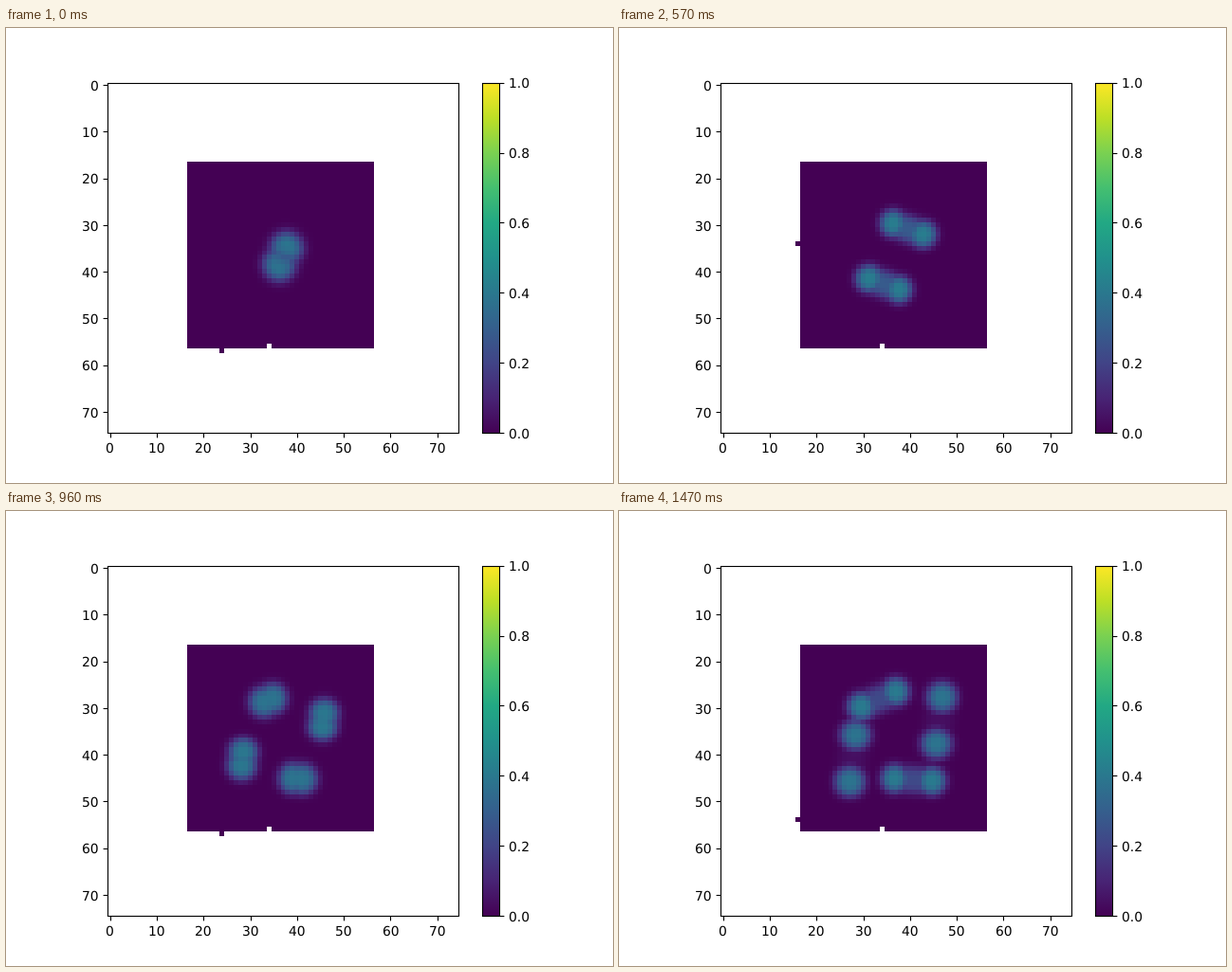
Animation of 640 by 480 pixels, one loop 1500 ms. Source, as an HTML page with a canvas:

```html
<!DOCTYPE html>
<html lang="en">
<head>
<meta charset="utf-8">
<title>Dividing spots</title>
<style>
html, body { margin: 0; width: 640px; height: 480px; overflow: hidden; background: #fff; }
canvas { display: block; }
</style>
</head>
<body>
<canvas id="stage" width="640" height="480"></canvas>
<script>
const ctx = document.getElementById('stage').getContext('2d');
const LEFT = 107.2, TOP = 57.6, SIZE = 369.6, CELL = SIZE / 75;
const FIRST = 17, SIDE = 40, STEPS = 50, STEP_MS = 30;

const viridis = ['440154', '482475', '414487', '355f8d', '2a788e', '21918c',
  '22a884', '44bf70', '7ad151', 'bddf26', 'fde725'];
const stops = viridis.map(hex => [0, 2, 4].map(i => parseInt(hex.slice(i, i + 2), 16)));

function colour(v) {
  const x = Math.max(0, Math.min(1, v)) * 10, i = Math.min(9, Math.floor(x));
  return `rgb(${stops[i].map((c, k) => Math.round(c + (stops[i + 1][k] - c) * (x - i)))})`;
}

// Each generation: start step and, per cell, the axis (radians) and pace of its division.
const generations = [
  { start: -4.5, axes: [-1.16], paces: [1] },
  { start: 11, axes: [.34], paces: [1] },
  { start: 26, axes: [-.4, 1.69, 1.69, .06], paces: [.42, .57, .57, .42] },
];

// Distance of a daughter from the point of division.
const spread = age => 6.9 * (1 - Math.exp(-((Math.max(0, age) / 10.8) ** 1.3)));

// Returns the spots and the bridges that still join sisters.
function colonyAt(n) {
  let cells = [{ x: 37, y: 36.8, pinch: 0 }];
  const bridges = [];
  for (const { start, axes, paces } of generations) {
    cells = cells.flatMap((cell, i) => {
      const axis = axes[i % axes.length];
      const s = spread((n - start) * paces[i % paces.length]);
      const pinch = Math.max(cell.pinch, Math.sin(Math.PI * Math.min(1, s / 6)));
      const dx = s * Math.cos(axis), dy = s * Math.sin(axis);
      const strength = (1 - .09 * s) / (1 + (s / 4.5) ** 14);
      bridges.push({ x: cell.x, y: cell.y, dx, dy, s, pinch, strength });
      return [-1, 1].map(side => ({ x: cell.x + side * dx, y: cell.y + side * dy, pinch }));
    });
    if (start === generations[0].start) cells.reverse();
  }
  return { cells, bridges };
}

function fieldAt(n) {
  const { cells, bridges } = colonyAt(n);
  const seed = Math.exp(-n / 3);
  // Cells are narrower and brighter while they divide.
  const glow = (r, pinch) => (.35 + .07 * pinch)
    * Math.exp(-.69 * (r / (3.2 - .6 * pinch + .5 * seed)) ** 3.2);
  return (x, y) => {
    let v = 0;
    for (const c of cells) v = Math.max(v, glow(Math.hypot(x - c.x, y - c.y), c.pinch));
    for (const b of bridges) {
      const px = x - b.x, py = y - b.y;
      const t = Math.max(-1, Math.min(1, (px * b.dx + py * b.dy) / (b.s * b.s || 1)));
      v = Math.max(v, b.strength * glow(Math.hypot(px - t * b.dx, py - t * b.dy), b.pinch));
    }
    return v - .09 * seed * Math.exp(-((x - 37) ** 2 + (y - 37) ** 2) / 5);
  };
}

function fillCell(col, row, fill) {
  const x = Math.round(LEFT + col * CELL), y = Math.floor(TOP + row * CELL);
  ctx.fillStyle = fill;
  ctx.fillRect(x, y, Math.round(LEFT + (col + 1) * CELL) - x,
    Math.floor(TOP + (row + 1) * CELL) - y);
}

// The walker circles the square clockwise, ten cells per step.
function walker(n) {
  const s = (112 + 10 * n) % (4 * SIDE), d = s % SIDE, end = FIRST + SIDE;
  return [[FIRST + d, FIRST - 1], [end, FIRST + d],
    [end - 1 - d, end], [FIRST - 1, end - 1 - d]][Math.floor(s / SIDE)];
}

const snap = v => Math.floor(v + .5) + .5;

function line(x1, y1, x2, y2) {
  ctx.beginPath();
  ctx.moveTo(x1, y1);
  ctx.lineTo(x2, y2);
  ctx.stroke();
}

// Text starts on a whole pixel; align is the share of its width left of x.
function label(text, x, y, align) {
  ctx.fillText(text, Math.round(x - align * ctx.measureText(text).width), Math.ceil(y));
}

function drawAxes() {
  const bar = ctx.createLinearGradient(0, 427, 0, 58);
  viridis.forEach((hex, i) => bar.addColorStop(i / 10, '#' + hex));
  ctx.fillStyle = bar;
  ctx.fillRect(502, 58, 18, 369);

  ctx.strokeStyle = ctx.fillStyle = '#000';
  ctx.lineWidth = 1.11;
  ctx.font = '13.89px "DejaVu Sans", sans-serif';
  ctx.textRendering = 'geometricPrecision';
  ctx.strokeRect(107.5, 58.5, 370, 369);
  ctx.strokeRect(502.5, 58.5, 18, 369);
  for (let v = 0; v <= 70; v += 10) {
    const x = LEFT + (v + .5) * CELL, y = TOP + (v + .5) * CELL;
    line(snap(x), 427.5, snap(x), 432.4);
    label(v, x, 448, .5);
    line(102.6, snap(y), 107.5, snap(y));
    label(v, 97.5, y + 5.2, 1);
  }
  for (let i = 0; i <= 5; i++) {
    const y = TOP + SIZE * (1 - i / 5);
    line(520.5, snap(y), 525.4, snap(y));
    label((i / 5).toFixed(1), 529.8, y + 5.2, 0);
  }
}

function draw(n) {
  ctx.fillStyle = '#fff';
  ctx.fillRect(0, 0, 640, 480);
  const field = fieldAt(n);
  for (let row = FIRST; row < FIRST + SIDE; row++) {
    for (let col = FIRST; col < FIRST + SIDE; col++) fillCell(col, row, colour(field(col, row)));
  }
  fillCell(34, 56, '#fff');
  fillCell(...walker(n), colour(0));
  drawAxes();
}

function tick() {
  draw(Math.floor(performance.now() / STEP_MS) % STEPS);
  requestAnimationFrame(tick);
}
tick();
</script>
</body>
</html>
```
